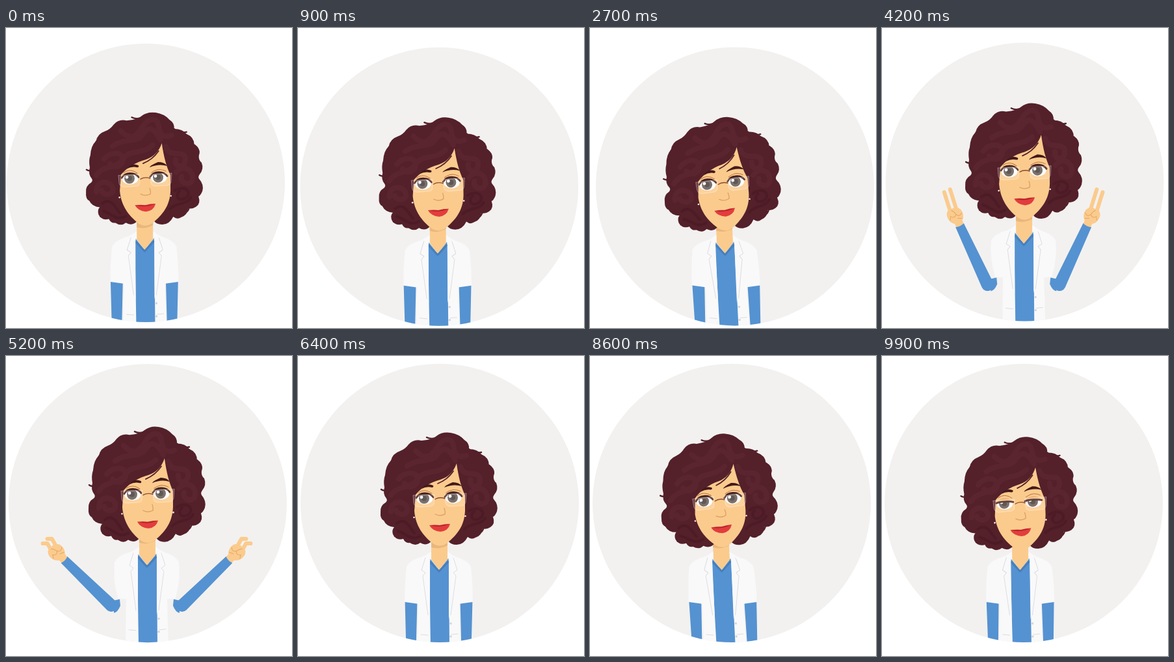
Animation, 440 px wide and 461 px high, one loop 10000 ms. Source, as an HTML page:

```html
<!DOCTYPE html>
<html lang="en">
<head>
<meta charset="utf-8">
<title>Doctor making air quotes</title>
<style>
html, body { margin: 0; width: 100%; height: 100%; overflow: hidden; background: #fff; }
svg { display: block; width: 100%; height: 100%; }
.line { fill: none; stroke-linecap: round; stroke-linejoin: round; }
</style>
</head>
<body>
<svg viewBox="0 0 440 461">
  <defs>
    <clipPath id="disc"><circle cx="218" cy="226" r="214"/></clipPath>
    <clipPath id="hairClip"><use href="#hairShape"/></clipPath>
    <clipPath id="eyeClip"><ellipse rx="12.5" ry="9"/></clipPath>
    <g id="eye">
      <ellipse rx="12.5" ry="9" fill="#fff"/>
      <circle cx="-1" r="8" fill="#655a54"/>
      <circle cx="-1" r="4" fill="#463d3a"/>
      <circle cx="-5" cy="-2" r="2.4" fill="#fff"/>
      <rect id="lid" x="-14" y="-10" width="28" fill="#efb878" clip-path="url(#eyeClip)"/>
      <path id="lashes" class="line" stroke="#49201e" stroke-width="2.8"/>
    </g>
  </defs>
  <g id="scene">
    <circle cx="218" cy="226" r="214" fill="#f2f1f0"/>
    <g clip-path="url(#disc)">
      <g id="body">
        <path fill="#f9f9fa" d="M205 301L196 307L181 313L184 345L186 382L185 450H251L249 382L251 345L255 313L240 307L232 301Z"/>
        <path fill="#5592d1" d="M203 310L218 329L233 310L234 450H205Z"/>
        <path fill="#fbcb8d" d="M206 268H231V313L218 329L206 313Z"/>
        <path fill="#e9b67b" d="M206 270H231V291Q218 298 206 294Z"/>
        <path class="line" stroke="#477fbd" stroke-width="3" d="M204 316L218 331L232 316"/>
        <path fill="#f9f9fa" d="M206 302L194 308L190 329L196 333L192 338L204 405L204 316ZM231 302L243 308L247 329L241 333L245 338L233 405L233 316Z"/>
        <path class="line" stroke="#dddce0" stroke-width="1" d="M197 310L191 329L197 333L193 338L201 398M240 310L246 329L240 333L244 338L236 398M190 428L201 429M237 428L247 427"/>
        <g fill="#d3d3d7"><circle cx="236" cy="411" r="1.7"/><circle cx="236" cy="431" r="1.7"/></g>
        <g id="arm">
          <path fill="#5592d1" d="M167 383L176 381L177 391Q173 401 167 402Z"/>
          <g id="forearm">
            <path id="fingers" class="line" stroke="#fbcb8d" stroke-width="6"/>
            <path fill="#fbcb8d" d="M-6 96L-7 106Q-14 112 -12 122Q-8 130 0 129Q10 131 12 121Q13 111 6 106L6 96Z"/>
            <path class="line" stroke="#e2a769" stroke-width="1" d="M-11 117Q-6 112 -2 118Q3 113 7 119M-2 118Q-1 124 2 127M7 119L10 114M-8 109L-2 112"/>
            <path fill="#5592d1" d="M-9.500 0A9.500 9.500 0 0 1 9.500 0L7 101Q0 98 -7 101Z"/>
          </g>
          <path id="sleeve" fill="#f9f9fa"/>
        </g>
        <use href="#arm" transform="translate(435 0) scale(-1 1)"/>
      </g>
      <g id="head">
        <path id="hairShape" fill="#54202a" d="M198 129Q208 127 213 123Q222 116 235 118Q248 120 256 129Q264 134 263 143Q276 143 282 151Q294 156 294 168Q305 175 301 184Q300 191 305 195Q309 205 302 213Q299 217 301 220Q309 229 306 239Q303 246 300 247Q304 258 296 263Q290 267 284 265Q283 276 273 279Q267 283 261 278Q255 290 244 290Q235 290 231 284L206 284Q198 293 188 287Q181 293 172 287Q165 288 162 281Q151 284 146 274Q144 267 148 263Q136 262 132 253Q126 250 127 240Q126 230 135 225Q138 222 136 219Q130 212 133 202Q131 191 134 183Q135 168 143 161Q145 150 157 146Q165 143 170 136Q178 127 190 130Z"/>
        <path class="line" stroke="#54202a" stroke-width="2.4" d="M198 125Q207 130 220 122M258 133Q262 136 261 144M263 143Q270 151 282 148M142 164Q146 156 157 153M128 205Q137 211 141 195M150 276Q155 281 166 277M294 168Q302 174 300 180M152 265Q147 272 149 277M279 272Q284 271 286 263"/>
        <g clip-path="url(#hairClip)" class="line">
          <g stroke="#622b36" stroke-width="8" opacity=".6">
            <path d="M181 146C198 164 208 150 215 139S237 122 239 138S248 157 259 153"/>
            <path d="M168 169C188 155 205 166 215 151S234 145 242 160"/>
            <path d="M155 189C164 177 183 177 184 189S170 205 164 196"/>
            <path d="M143 214C153 198 173 205 184 189S214 183 230 168"/>
            <path d="M143 239C142 221 164 221 168 233S153 246 151 237"/>
            <path d="M250 170C255 189 279 174 280 189S263 204 265 190"/>
            <path d="M266 210C276 198 292 205 291 219S270 227 274 216"/>
          </g>
          <g stroke="#481a24" stroke-width="4" opacity=".6">
            <path d="M263 238C282 227 291 244 279 250S264 243 271 239"/>
            <path d="M256 266C265 256 282 260 288 249M152 257C166 246 173 266 179 272M154 269C167 273 174 285 188 277"/>
          </g>
        </g>
        <path fill="#fbcb8d" d="M244 165C239 179 231 186 219 190C204 194 190 202 181 213L179 238C181 262 193 276 206 287Q218 296 230 287C244 275 256 262 257 238V214C251 201 247 187 244 165Z"/>
        <path class="line" stroke="#54202a" stroke-width="1.800" d="M239 177Q230 190 215 196"/>
        <path fill="#43191a" d="M190 204Q197 194 208 199Q209 202 206 202Q198 200 190 204ZM225 202Q226 199 238 194Q248 194 252 200Q239 196 225 202Z"/>
        <path class="line" stroke="#b87547" stroke-width="1" d="M185 210Q195 203 206 211M228 210Q239 202 250 208"/>
        <use href="#eye" x="195" y="219"/>
        <use href="#eye" x="239" y="217.500"/>
        <path fill="#fff" fill-opacity=".14" stroke="#fff" stroke-opacity=".35" stroke-width="1" d="M177 214L210 213L209 228Q207 231 202 231L185 232Q179 231 178 226ZM226 213L259 211L258 225Q256 230 251 230L233 231Q228 230 227 226Z"/>
        <path class="line" stroke="#8c4a31" stroke-width="1.400" d="M211 220Q218 216 226 219"/>
        <path class="line" stroke="#dca366" stroke-width="1.400" d="M211 243Q218 247 226 243Q227 240 225 234"/>
        <path fill="#e23d3d" d="M202 260Q218 262 234 258Q231 269 219 270Q207 269 202 260Z"/>
        <path fill="#bd252c" d="M202 260Q211 259 218 260Q226 258 234 258Q218 265 202 260Z"/>
        <g fill="#f8f3ee"><circle cx="178.500" cy="248" r="1.3"/><circle cx="257.500" cy="246" r="1.3"/></g>
      </g>
    </g>
  </g>
</svg>
<script>
const $ = id => document.getElementById(id);
const LOOP = 10000, STEP = 100, CYCLE = 2950, START = 800;
const mix = (a, b, k) => a + (b - a) * k;
const move = (id, value) => $(id).setAttribute("transform", value);

// Smooth step from 0 at a to 1 at b
function ramp(t, a, b) {
  const k = Math.min(1, Math.max(0, (t - a) / (b - a)));
  return k * k * (3 - 2 * k);
}

// Smooth hill of height 1 around mid
function bump(t, mid, half) {
  const d = Math.abs(t - mid) / half;
  return d < 1 ? Math.cos(d * Math.PI / 2) ** 2 : 0;
}

function camera(t) {
  const x = -3 * Math.max(0, 1 - t / 5300) + 6.5 * bump(t, 2600, 2600);
  const y = 12 * (1 - ramp(t, 3900, 5300)) + 6 * (bump(t, 800, 800) + bump(t, 2900, 1000));
  move("scene", `translate(${x} ${y})`);
}

function arms(p, up) {
  const swing = 159 * (ramp(p, 310, 345) - ramp(p, 1350, 1750)) - 4 * bump(p, 450, 150);
  move("forearm", `translate(${mix(175, 162, up)} ${mix(374, 392, up)}) rotate(${swing})`);
  $("sleeve").setAttribute("d",
    `M196 308Q174 312 168 324Q165 350 ${mix(165, 174, up)} ${mix(378, 380, up)}L187 381L189 320Z`);

  // Fingers curl three times, then stay curled
  const curl = p < 450 ? 0 : p > 1200 ? 1 : (1 - Math.cos((p - 450) / 150 * Math.PI)) / 2;
  const tip = mix(157, 142, curl), hook = curl * 5;
  const finger = (x0, x1) => `M${x0} 120L${x1} ${tip - hook}L${x1 + hook} ${tip}`;
  $("fingers").setAttribute("d", finger(-5, -10) + finger(5, 0));
}

function eyes(shut) {
  const lid = 2 + 5 * shut, y = lid - 10;
  $("lid").setAttribute("height", lid);
  $("lashes").setAttribute("d", `M-13 -1Q-9 ${y} 0 ${y}Q9 ${y} 13 -2`);
}

function draw(t) {
  const p = (t - START + CYCLE) % CYCLE;
  const up = ramp(p, 310, 345) - ramp(p, 1400, 1700);
  const crouch = bump(p, 250, 240), sway = bump(p, 1900, 300);
  const hx = -6 * crouch - 19 * sway + 5 * bump(p, 2380, 270);
  const hy = 7 * crouch - 7 * up - 3 * bump(p, 450, 200) + 2.5 * sway;

  camera(t);
  // The body leans from the waist
  move("body", `matrix(1 0 ${-hx / 440} 1 ${hx * 1.5 - 1} ${-8 * up})`);
  move("head", `translate(${218 + hx} ${219 + hy}) rotate(${-2 * crouch - 4.5 * sway})
    scale(1 ${1 + 0.03 * up}) translate(-218 -219)`);
  arms(p, up);
  eyes(bump(p, 250, 150));
}

const origin = performance.now();
function tick(now) {
  const t = Math.max(0, now - origin) % LOOP;
  draw(Math.floor(t / STEP) * STEP);
  requestAnimationFrame(tick);
}
draw(0);
requestAnimationFrame(tick);
</script>
</body>
</html>
```
